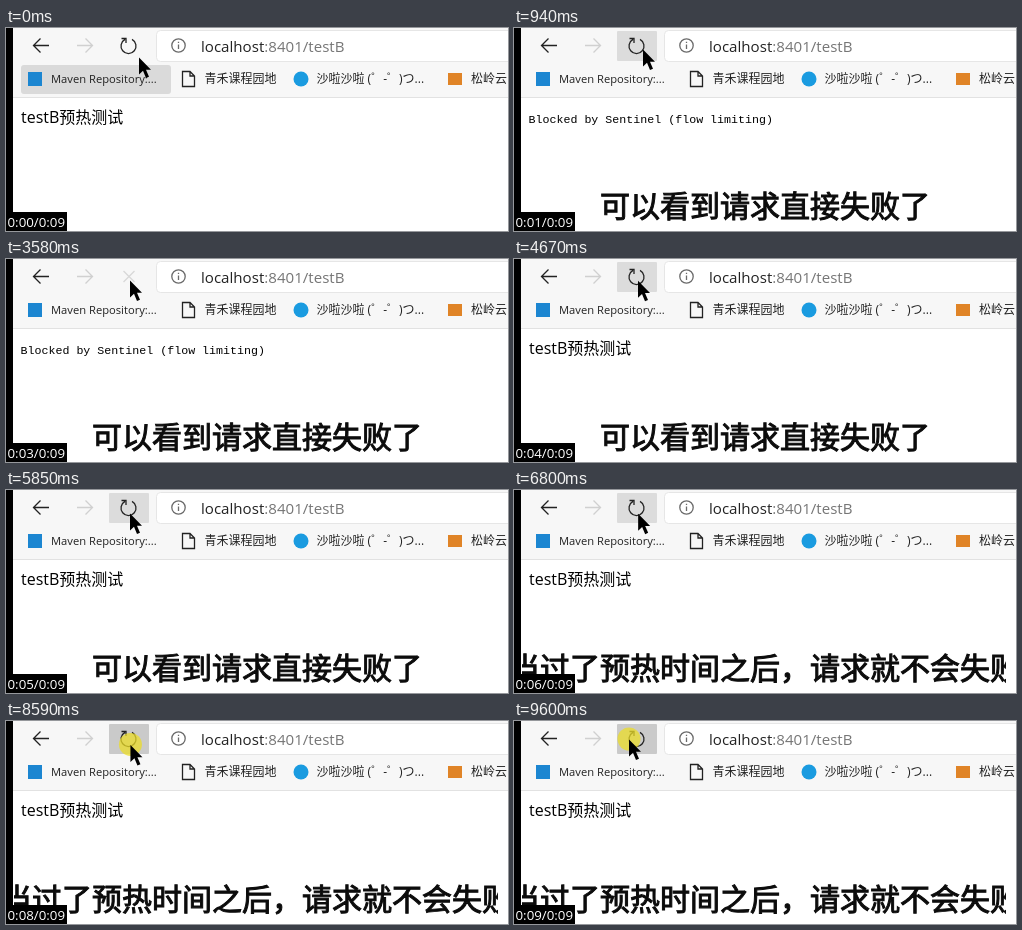
Recreate the animation shown at these times as an HTML page. Size 502 px wide and 203 px high, loop 9.68 s.

```html
<!DOCTYPE html>
<html lang="zh-CN">
<meta charset="utf-8">
<style>
  html, body { margin: 0; width: 100%; height: 100%; overflow: hidden; background: #fff; }
  svg { display: block; }
  text { font-family: 'Open Sans', 'Noto Sans CJK SC', 'Noto Sans CJK', sans-serif; white-space: pre; }
  .mark { font-size: 12px; fill: #222; }
  .line { fill: none; stroke: #222; stroke-width: 1.3; }
  .subtitle { font-size: 30px; fill: #0c0c0c; stroke: #0c0c0c; stroke-width: 1; }
  #blocked { font: 11.65px 'Liberation Mono', monospace; }
</style>
<svg width="502" height="203" viewBox="0 0 502 203">
  <clipPath id="video"><rect x="8" width="484" height="203"/></clipPath>
  <rect width="502" height="69" fill="#f7f7f7"/>
  <path d="M0 69.5H502" stroke="#e2e2e2"/>
  <rect x="150.500" y="2.500" width="370" height="31" rx="4" fill="#fff" stroke="#e6e6e6"/>

  <path class="line" d="M43 17.500H28M34.500 10.500l-7 7 7 7"/>
  <path class="line" d="M71 17.500H86M79.500 10.500l7 7-7 7" style="stroke:#d0d0d0"/>
  <rect id="button" x="103" y="3" width="40" height="30" rx="1"/>
  <path id="reload" class="line" d="M126 11.400A7.500 7.500 0 1 1 119 11.400M115.500 10.500h4.500v4.500"/>
  <path id="stop" class="line" d="M117.500 12l11 11m0-11l-11 11" style="stroke:#d8d8d8"/>
  <circle id="press" r="11.500" fill="#ebdc28" opacity=".75"/>

  <circle class="line" cx="172.500" cy="17.500" r="6.700" style="stroke:#6a6a6a"/>
  <path class="line" d="M172.500 16.500v4.500M172.500 13.700v1.400" style="stroke:#6a6a6a"/>
  <text x="195" y="24" font-size="15.100" fill="#222">localhost<tspan fill="#767676">:8401/testB</tspan></text>

  <rect id="hover" x="15" y="37" width="150" height="29" rx="3" fill="#dadada"/>
  <rect x="22" y="44" width="14" height="14" fill="#1c86d1"/>
  <text class="mark" x="45" y="55" style="font-size:11.200px">Maven Repository:...</text>
  <path class="line" d="M176.500 43.500h7.500l4.500 4.500v10.500h-12zM184 43.500v4.500h4.500"/>
  <text class="mark" x="198.500" y="55">青禾课程园地</text>
  <circle cx="295" cy="51" r="7.500" fill="#1a9be0"/>
  <text class="mark" x="310.500" y="55">沙啦沙啦 (゜-゜)つ...</text>
  <rect x="442" y="45" width="14" height="12" fill="#e08427"/>
  <text class="mark" x="465" y="55">松岭云</text>

  <text id="passed" x="15" y="95" font-size="16">testB预热测试</text>
  <text id="blocked" x="14.500" y="95">Blocked by Sentinel (flow limiting)</text>
  <g clip-path="url(#video)">
    <text id="failing" class="subtitle" x="86" y="189">可以看到请求直接失败了</text>
    <text id="warmed" class="subtitle" x="-4" y="189">当过了预热时间之后，请求就不会失败</text>
  </g>
  <rect width="7" height="203"/>
  <rect y="184" width="61" height="19"/>
  <text id="clock" x="1.500" y="198.500" font-size="13.300" fill="#fff"></text>
  <path id="cursor" d="M0 0V17L4 13.300 7 20.500 10 19.200 7 12.300H12Z"/>
</svg>
<script>
const LOOP = 9680;
const $ = id => document.getElementById(id);
const show = (id, on) => $(id).style.display = on ? '' : 'none';

// Time, button (n idle, h hover, p pressed, x loading), page (t passed, b blocked, - empty)
const states = `0nt 150ht 230pt 310x- 390ht 630p- 700ht 870p- 940hb 1250pb 1330hb 1480pb
  1560hb 1710x- 1800ht 1950pt 2030x- 2110ht 2270h- 2420p- 2500x- 2570hb 2730pb 2810x- 2890hb
  3050xb 3900hb 4050pb 4130x- 4210ht 4440pt 4520x- 4600ht 4990hb 5160xb 5230hb 5690p- 5770ht
  6070pt 6150ht 6320p- 6400hb 6640p- 6720x- 6800ht 6950pt 7030x- 7110ht 7350pt 7430x- 7500ht
  7660pt 7740x- 7820ht 8200pt 8280x- 8360ht 8590pt 8670x- 8750ht 9510pt`
  .split(/\s+/).map(s => [parseInt(s), ...s.slice(-2)]);

const path = [[0, 133, 29.5], [80, 133, 29.5], [460, 129, 21.5], [3270, 129, 21.5], [3580, 124, 21.5],
  [5690, 124, 22], [5850, 124, 23.5], [8970, 124.5, 24], [9250, 135, 24], [9510, 116, 19.5],
  [9600, 115, 18.5], [LOOP, 115, 18.5]];

const fills = { n: 'none', h: '#dcdcdc', p: '#cacaca', x: 'none' };

function cursorAt(t) {
  const i = path.findIndex(p => p[0] > t);
  const [t0, x0, y0] = path[i - 1], [t1, x1, y1] = path[i];
  const k = (t - t0) / (t1 - t0);
  return [x0 + (x1 - x0) * k, y0 + (y1 - y0) * k];
}

function draw(now) {
  const t = now % LOOP;
  const [, button, page] = states.filter(s => s[0] <= t).pop();
  const [x, y] = cursorAt(t);
  $('button').setAttribute('fill', fills[button]);
  $('cursor').setAttribute('transform', `translate(${x} ${y})`);
  $('press').setAttribute('transform', `translate(${x} ${y - 0.5})`);
  show('press', button === 'p');
  show('reload', button !== 'x');
  show('stop', button === 'x');
  show('hover', t < 150);
  show('passed', page === 't');
  show('blocked', page === 'b');
  show('failing', t >= 870 && t < 6640);
  show('warmed', t >= 6640);
  $('clock').textContent = `0:0${Math.floor((t + 70) / 1000) % 10}/0:09`;
  requestAnimationFrame(draw);
}
draw(0);
</script>
</html>
```
